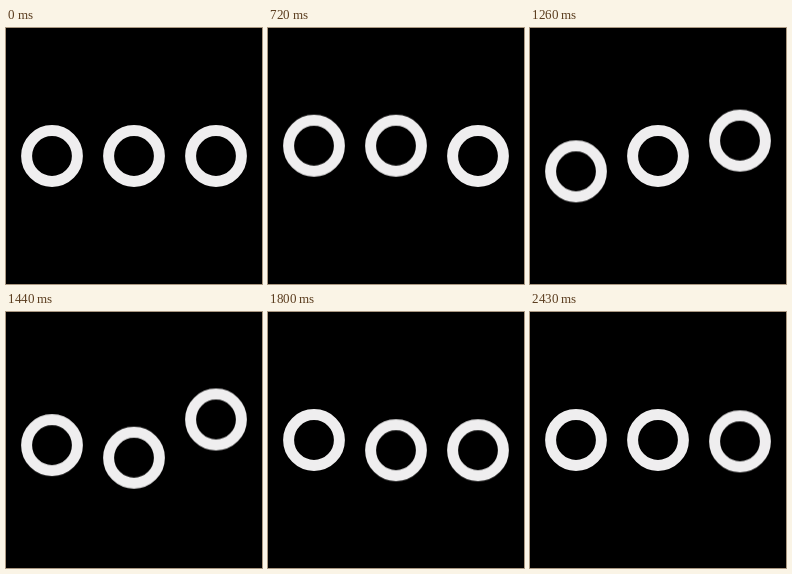
Animation, 256 px wide and 256 px high, one loop 2520 ms. Source, as an HTML page:

```html
<!DOCTYPE html>
<html lang="en">
<head>
<meta charset="utf-8">
<title>Three bouncing rings</title>
<style>
  html, body { margin: 0; width: 100%; height: 100%; overflow: hidden; background: #000; }
  svg { display: block; width: 100vw; height: 100vh; }
  circle { fill: none; stroke: #efeeef; stroke-width: 11; }
</style>
</head>
<body>
<svg viewBox="0 0 256 256">
  <circle cx="46" cy="128" r="25.4"/>
  <circle cx="128" cy="128" r="25.4"/>
  <circle cx="210" cy="128" r="25.4"/>
</svg>
<script>
  const STEP = 90, STEPS = 28, DELAY = 5, LEG = 6;
  const STOPS = [0, -20.5, 20.5, 0];

  const easeSine = p => (1 - Math.cos(Math.PI * p)) / 2;

  // Vertical offset of a ring, n steps after its bounce begins.
  function offset(n) {
    const leg = Math.floor(n / LEG);
    if (n < 0 || leg >= STOPS.length - 1) return 0;
    const from = STOPS[leg], to = STOPS[leg + 1];
    return from + (to - from) * easeSine(n / LEG - leg);
  }

  document.querySelectorAll('circle').forEach((ring, i) => {
    const frames = Array.from({ length: STEPS + 1 }, (_, n) => ({
      offset: n / STEPS,
      transform: `translateY(${offset(n - i * DELAY).toFixed(2)}px)`,
      easing: 'steps(1, end)'
    }));
    const anim = ring.animate(frames, { duration: STEP * STEPS, iterations: Infinity });
    anim.startTime = 0;
  });
</script>
</body>
</html>
```
